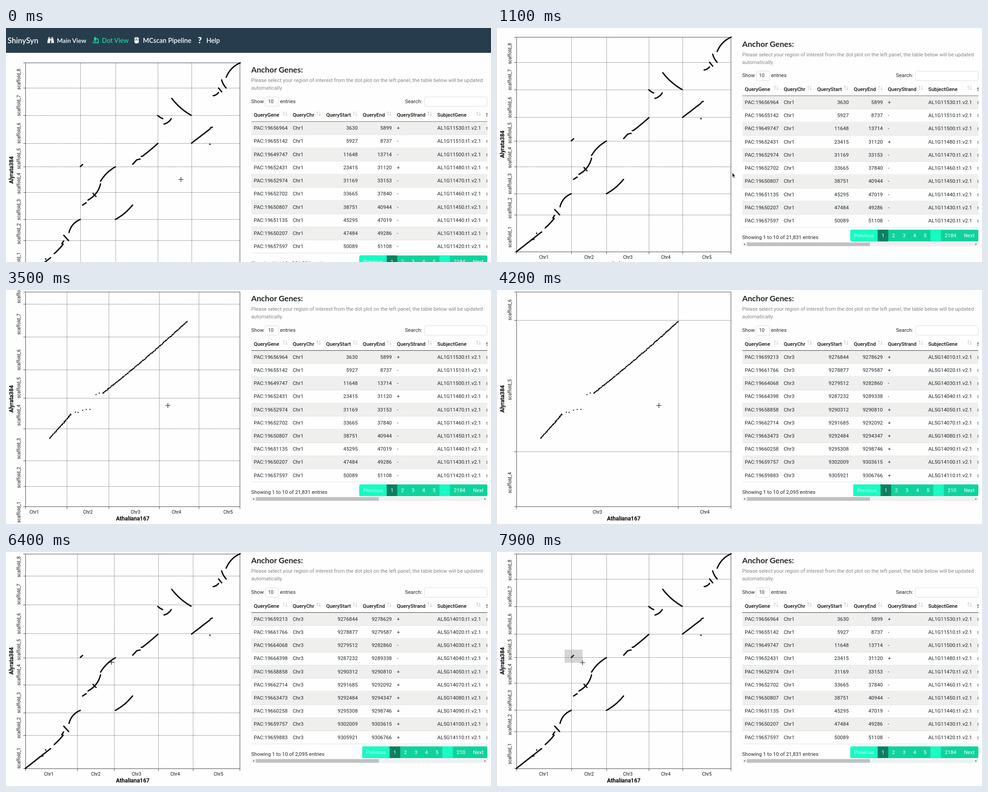
Recreate the animation shown at these times as an HTML page with a canvas. Size 1077 by 520 pixels, loop 8 s.

```html
<!DOCTYPE html>
<html lang="en">
<head>
<meta charset="utf-8">
<title>Synteny dot view</title>
<style>
  html, body { margin: 0; width: 100%; height: 100%; overflow: hidden; background: #fefefe; }
  canvas, svg { position: absolute; left: 0; top: 0; width: 1077px; height: 520px; }
  svg { font: 11.4px Roboto, sans-serif; fill: #212529; }
  .nav { font: 600 14.3px Lato, sans-serif; fill: #fff; }
  .title { font: 700 17.6px Lato, sans-serif; }
  .head { font-weight: 500; fill: #111; }
  .axis { font-size: 10px; fill: #111; text-anchor: middle; }
  .name { font-size: 12.5px; font-weight: 500; fill: #000; stroke: #000; stroke-width: .25; text-anchor: middle; }
  .mid { text-anchor: middle; }
  .end { text-anchor: end; }
</style>
</head>
<body>
<canvas id="plot" width="1077" height="520"></canvas>
<svg id="ui" viewBox="0 0 1077 520">
  <defs>
    <clipPath id="tableClip"><rect x="545" y="100" width="524" height="380"/></clipPath>
    <clipPath id="plotClip"><rect x="5" y="-20" width="527" height="640"/></clipPath>
  </defs>
</svg>
<script>
const LOOP = 8000, STEP = 100, SCROLL = 73.5;
const BOX = { l: 43, t: 4, r: 520, b: 481 };
const SEL = { l: 271.5, t: 171.15, r: 359, b: 256.5 };
const X_EDGES = [43, 165, 243.5, 337.5, 412, 520];
const Y_EDGES = [481, 399, 351.7, 291.8, 234.7, 182.5, 121, 60, 4];

// Syntenic blocks: start, end and sideways bend of an arc
const BLOCKS = [
  [43, 481, 99, 437, 0], [107, 428, 127, 407, .05], [124, 406, 128, 400, 0], [128, 387, 139, 399, 0],
  [140, 381, 165, 352, -.25], [165, 234.5, 170, 230, 0], [170, 320, 178, 315, 0],
  [182, 309, 210, 273, .22], [210, 267, 243, 235, -.13], [243, 352, 281, 320, .1],
  [281.3, 229.5, 290, 220, 0], [303, 211.5, 337.3, 183, .02], [337, 121, 348, 128, .1],
  [351, 140, 367, 128, .2], [368, 83, 411, 120.5, .1], [412, 182.5, 453, 151, 0],
  [460, 77, 472, 70, .2], [472, 60, 479, 68.5, 0], [479, 42, 489, 60, .13], [489, 36, 520, 4, -.2]
];
// Thin trails of stray dots: start and end
const TRAILS = [
  [290, 219.5, 298, 217.5], [300, 212, 303, 211.3], [193, 294, 200, 301], [79, 454, 82, 453],
  [88, 440, 88, 440], [453, 185, 453, 185], [454, 149, 458, 147]
];
// Pointer moves: from time, to time, destination
const MOVES = [
  [0, 0, 388.5, 336.5], [200, 400, 527, 325], [500, 600, 522.5, 321.5], [1500, 2200, 278.5, 187.5],
  [2200, 2400, 271.5, 172], [2500, 3000, 359.5, 256.5], [5000, 5400, 253, 246], [6300, 6900, 141.5, 241],
  [6900, 7200, 150, 217], [7300, 7700, 190, 241.5], [7800, 7900, 190, 246]
];
const FULL_ROWS = `19656964 3630 5899 + AL1G11530
19655142 5927 8737 - AL1G11510
19649747 11648 13714 - AL1G11500
19652431 23415 31120 + AL1G11480
19652974 31169 33153 - AL1G11470
19652702 33665 37840 - AL1G11460
19650807 38751 40944 - AL1G11450
19651135 45295 47019 - AL1G11440
19650207 47484 49286 - AL1G11430
19657597 50089 51108 - AL1G11420`;
const ZOOM_ROWS = `19659213 9276844 9278629 + AL5G14010
19661766 9278877 9279587 + AL5G14020
19664068 9279512 9282860 - AL5G14030
19664398 9287232 9289338 - AL5G14040
19658858 9290312 9290810 + AL5G14050
19662714 9291685 9292092 + AL5G14070
19663473 9292484 9294347 + AL5G14080
19660258 9295308 9298746 + AL5G14090
19659757 9302009 9303615 + AL5G14100
19659883 9305921 9306766 + AL5G14110`;

const mix = (a, b, u) => a + (b - a) * u;
const clamp = v => Math.min(1, Math.max(0, v));
const ease = v => (v = clamp(v)) < .5 ? 4 * v ** 3 : 1 - 4 * (1 - v) ** 3;

function pointer(t) {
  let [, , x, y] = MOVES[0];
  for (const [from, to, px, py] of MOVES.slice(1)) {
    const u = clamp((t - from) / (to - from));
    x = mix(x, px, u);
    y = mix(y, py, u);
  }
  return [x, y];
}

// ---- text and panels ----
const ui = document.getElementById('ui');
const ctx = document.getElementById('plot').getContext('2d');

function textWidth(s, weight = 400) {
  ctx.font = `${weight} 11.4px Roboto, sans-serif`;
  return ctx.measureText(s).width;
}
function el(parent, tag, attrs = {}, text) {
  const node = document.createElementNS('http://www.w3.org/2000/svg', tag);
  for (const k in attrs) node.setAttribute(k, attrs[k]);
  if (text !== undefined) node.textContent = text;
  return parent.appendChild(node);
}
const label = (p, x, y, s, cls = '', more = {}) => el(p, 'text', { x, y, class: cls, ...more }, s);
const rect = (p, x, y, width, height, fill, more = {}) => el(p, 'rect', { x, y, width, height, fill, ...more });
const path = (p, d, more = {}) => el(p, 'path', { d, ...more });
const field = (p, x, y, w, h) => rect(p, x + .5, y + .5, w - 1, h - 1, '#fff', { rx: 3, stroke: '#d8dbde' });

const page = el(ui, 'g');
buildHeader(el(page, 'g', { transform: `translate(0 ${-SCROLL})` }));
const axes = el(page, 'g', { 'clip-path': 'url(#plotClip)' });
label(axes, 0, 0, 'Alyrata384', 'name', { transform: 'translate(16.2 242) rotate(-90)' });
label(axes, 281.5, 512.3, 'Athaliana167', 'name');
const xLabels = X_EDGES.slice(1).map((_, i) => label(axes, 0, 496.6, 'Chr' + (i + 1), 'axis'));
const yLabels = Y_EDGES.slice(1).map((_, i) => label(axes, 0, 0, 'scaffold_' + (i + 1), 'axis'));

function buildHeader(g) {
  const green = '#14d6a0';
  rect(g, 0, -20, 1077, 75.2, '#273d4d');
  label(g, 3.5, 34, 'ShinySyn', 'nav', { style: 'font-size:17px' });
  label(g, 113, 32.7, 'Main View', 'nav', { style: 'font-size:13.9px' });
  label(g, 213, 32.7, 'Dot View', 'nav', { style: 'fill:' + green });
  label(g, 304, 32.7, 'MCscan Pipeline', 'nav', { style: 'font-size:14.6px' });
  label(g, 445, 32.7, 'Help', 'nav');
  label(g, 426, 34, '?', 'nav', { style: 'font-size:18.5px;font-weight:900' });
  path(g, 'M94 20.5h3.6v2H94zM100.8 20.5h3.6v2h-3.6zM93.5 23.3h4.4V33.5H92v-3.2zM100.5 23.3h4.4l1.5 7v3.2h-5.9zM98.4 23.3h1.6v5h-1.6z', { fill: '#fff' });
  path(g, 'M192 32.8h14M194 29.6h6.5M201 23.5c5.5.5 5.5 7.5 1.5 8.5', { fill: 'none', stroke: green, 'stroke-width': 1.8 });
  path(g, 'M195.5 21.3h1V20h3v1.3h1v6.5h-5z', { fill: green });
  path(g, 'M285 26v-1.5q0-4.3 4.5-4.3V26zM290.4 20.2q4.6 0 4.6 4.3V26h-4.6zM285 27h10v2.8q0 4.4-4.4 4.4h-1.2q-4.4 0-4.4-4.4z', { fill: '#fff' });
}

function sortMark(g, x) {
  path(g, `M${x - 2.5} 121.5v-9m-2 2.5l2-2.5l2 2.5M${x + 3} 112.5v9m-2-2.5l2 2.5l2-2.5`,
    { fill: 'none', stroke: '#c4c6c8', 'stroke-width': 1 });
}

// Each column is as wide as its heading with sort mark, or its widest cell
function buildPanel(cells, barY, thumb) {
  const g = el(page, 'g');
  label(g, 544.5, 25.3, 'Anchor Genes:', 'title');
  const note = ['Please select your region of interest from the dot plot on the left panel, the table below will be updated', 'automatically.'];
  note.forEach((s, i) => label(g, 544.5, 46.3 + i * 17, s, '', { fill: '#858585' }));
  label(g, 544.5, 93, 'Show');
  field(g, 575, 79, 31, 22);
  label(g, 582, 93, '10', '', { style: 'font-size:10.5px' });
  label(g, 608.5, 93, 'entries');
  label(g, 886, 93, 'Search:');
  field(g, 929, 79, 140, 22);
  const table = el(g, 'g', { 'clip-path': 'url(#tableClip)' });
  const cols = [];
  let x = 550.3;
  ['QueryGene', 'QueryChr', 'QueryStart', 'QueryEnd', 'QueryStrand', 'SubjectGene', 'SubjectChr'].forEach((s, i) => {
    cols.push(x);
    label(table, x, 123.6, s, 'head');
    x += Math.max(textWidth(s, 500) + 26.5, textWidth(cells[i] || '') + 11.2);
    sortMark(table, x - 17.2);
  });
  rect(table, 545, 134, 524, 1, '#3c3c3c');
  rect(g, 545, barY - 4.5, 524, 9, '#f0f0f0');
  rect(g, 555, barY - 4, thumb, 8, '#c0c0c0');
  path(g, `M551 ${barY - 2}v4l-2.5-2zM1062.5 ${barY - 2}v4l2.5-2z`, { fill: '#444' });
  return { g, table, cols };
}

function filledPanel(text, chr, scaffold, total, lastPage) {
  const rows = text.split('\n').map(s => {
    const [gene, start, end, strand, subject] = s.split(' ');
    return ['PAC:' + gene, chr, start, end, strand, subject + '.t1.v2.1', scaffold];
  });
  const panel = buildPanel(rows[0], 464.3, 273), { g, table, cols } = panel;
  rows.forEach((row, i) => {
    const top = 134.5 + i * 29.22;
    if (i % 2 === 0) rect(table, 545, top + .5, 524, 28.7, '#efefee');
    rect(table, 545, Math.round(top + 28.7), 524, 1, '#dfe1e3');
    row.forEach((s, c) => {
      const number = c === 2 || c === 3;
      label(table, number ? cols[c + 1] - 11.2 : cols[c], top + 18.2, s, number ? 'end' : '');
    });
  });
  label(g, 544.5, 453, `Showing 1 to 10 of ${total} entries`);
  buildPager(g, ['Previous', '1', '2', '3', '4', '5', '…', lastPage, 'Next']);
  return panel;
}

function buildPager(g, names) {
  const widths = names.map(s => textWidth(s === '…' ? '0' : s) + 17);
  let x = 1069 - widths.reduce((a, b) => a + b);
  rect(g, x, 432, 1069 - x, 26, '#0ed39c', { rx: 3.5 });
  names.forEach((s, i) => {
    const w = widths[i], off = s === 'Previous' || s === '…';
    if (off) rect(g, x, 432, w, 26, '#17fbc3', { rx: i ? 0 : 3.5 });
    if (s === '1') rect(g, x, 432, w, 26, '#0a8060');
    label(g, x + w / 2, 449, s, 'mid', { fill: off ? '#c9fff2' : '#fff' });
    x += w;
  });
}

const fullPanel = filledPanel(FULL_ROWS, 'Chr1', 'scaffold_1', '21,831', '2184');
const zoomPanel = filledPanel(ZOOM_ROWS, 'Chr3', 'scaffold_5', '2,095', '210');
const emptyPanel = buildPanel([], 153.7, 278);
field(emptyPanel.g, 465, 168, 143, 42);
label(emptyPanel.g, 536, 192.6, 'Processing...', 'mid');

const cross = path(ui, 'M-5.5 0h11M0-5.5v11', { stroke: '#111', 'stroke-width': 1.1 });
const arrow = path(ui, 'M0 0v10l2.2-2l1.6 4l1.6-.7l-1.6-3.8h2.9z', { fill: '#111', stroke: '#fff', 'stroke-width': .5 });

// ---- plot ----
let seed = 7;
const jitter = size => ((seed = seed * 16807 % 2147483647) / 2147483647 - .5) * size;

function strew([x1, y1, x2, y2, bend = 0], perPixel, scatter) {
  const n = Math.ceil(Math.hypot(x2 - x1, y2 - y1) * perPixel) || 1;
  return Array.from({ length: n + 1 }, (_, k) => {
    const u = k / n, bulge = 2 * u * (1 - u) * bend;
    return [mix(x1, x2, u) - (y2 - y1) * bulge + jitter(scatter), mix(y1, y2, u) + (x2 - x1) * bulge + jitter(scatter)];
  });
}

const zoomX = x => BOX.l + (x - SEL.l) * (BOX.r - BOX.l) / (SEL.r - SEL.l);
const zoomY = y => BOX.t + (y - SEL.t) * (BOX.b - BOX.t) / (SEL.b - SEL.t);
const fullDots = [...BLOCKS.flatMap(b => strew(b, 4, .3)), ...TRAILS.flatMap(b => strew(b, .6, .8))];
const zoomDots = fullDots
  .filter(([x, y]) => x > SEL.l && x < SEL.r && y > SEL.t && y < SEL.b)
  .map(([x, y]) => [zoomX(x), zoomY(y)]);

// A label heads for the middle of its visible range, or leaves with it
function labelAt(a, b, zoom, lo, hi, u) {
  const p = Math.min(zoom(a), zoom(b)), q = Math.max(zoom(a), zoom(b));
  const seen = q > lo && p < hi;
  const goal = seen ? (Math.max(p, lo) + Math.min(q, hi)) / 2 : (p + q) / 2;
  return mix((a + b) / 2, goal, u);
}

function line(x1, y1, x2, y2, color, dash = []) {
  ctx.setLineDash(dash);
  ctx.strokeStyle = color;
  ctx.beginPath();
  ctx.moveTo(x1, y1);
  ctx.lineTo(x2, y2);
  ctx.stroke();
}

function drawPlot(t, u, dy, cx, cy) {
  const snap = v => Math.floor(v) + .5, snapY = y => snap(y + dy);
  const top = snapY(BOX.t), bottom = snapY(BOX.b), left = BOX.l + .5, right = BOX.r - .5;
  const grid = '#858585', ink = '#484848', dash = [2, .8];
  ctx.clearRect(0, 0, 1077, 520);
  ctx.save();
  ctx.beginPath();
  ctx.rect(5, 0, 527, 520);
  ctx.clip();
  ctx.lineWidth = 1;
  X_EDGES.forEach((e, i) => {
    const inner = i > 0 && i < 5, x = inner ? snap(mix(e, zoomX(e), u)) : i ? right : left;
    if (inner) line(x, top, x, bottom, grid, dash);
    line(x, bottom, x, bottom + 5, ink);
  });
  Y_EDGES.forEach((e, i) => {
    const inner = i > 0 && i < 8, y = snapY(inner ? mix(e, zoomY(e), u) : e);
    if (inner) line(left, y, right, y, grid, dash);
    line(left - 5, y, left, y, ink);
  });
  ctx.setLineDash([]);
  ctx.strokeStyle = ink;
  ctx.strokeRect(left, top, right - left, bottom - top);

  const zoomed = t >= 3300 && t < 5900, r = zoomed ? 1.25 : 1.45;
  ctx.fillStyle = '#0a0a0a';
  ctx.beginPath();
  for (const [x, y] of zoomed ? zoomDots : fullDots) {
    ctx.moveTo(x + r, y + dy);
    ctx.arc(x, y + dy, r, 0, 7);
  }
  ctx.fill();

  const from = t >= 2600 && t < 3300 ? [271.5, 172] : t >= 7400 ? [150, 217] : null;
  if (from) {
    ctx.fillStyle = 'rgba(119,119,119,.3)';
    ctx.fillRect(from[0], from[1], cx - from[0], cy - from[1]);
  }
  ctx.restore();
}

function zoomLevel(t) {
  if (t < 4200) return ease((t - 3280) / 1000);
  return t < 5900 ? 1 : 1 - ease((t - 5532) / 1000);
}

function showPanel(t) {
  const now = t < 4200 || t >= 7100 ? fullPanel : t < 6800 ? zoomPanel : emptyPanel;
  for (const p of [fullPanel, zoomPanel, emptyPanel]) p.g.style.display = p === now ? '' : 'none';
  const fadeFrom = t < 4200 ? 3780 : t >= 5900 && t < 6800 ? 6400 : LOOP;
  now.g.style.opacity = mix(1, .3, clamp((t - fadeFrom) / 250));
}

function draw(t) {
  const dy = SCROLL * (1 - clamp((t - 500) / 700) ** 1.63), u = zoomLevel(t);
  const [cx, cy] = pointer(t);
  page.setAttribute('transform', `translate(0 ${dy})`);
  xLabels.forEach((n, i) =>
    n.setAttribute('x', labelAt(X_EDGES[i], X_EDGES[i + 1], zoomX, BOX.l, BOX.r, u)));
  yLabels.forEach((n, i) => {
    const y = labelAt(Y_EDGES[i], Y_EDGES[i + 1], zoomY, BOX.t, BOX.b, u) + 8.4;
    n.setAttribute('transform', `translate(31.6 ${y}) rotate(-90)`);
  });
  showPanel(t);
  drawPlot(t, u, dy, cx, cy);
  const outside = cx > BOX.r;
  cross.style.display = outside ? 'none' : '';
  arrow.style.display = outside ? '' : 'none';
  (outside ? arrow : cross).setAttribute('transform', `translate(${cx} ${cy})`);
}

function tick() {
  draw(Math.floor(performance.now() % LOOP / STEP) * STEP);
  requestAnimationFrame(tick);
}
tick();
</script>
</body>
</html>
```
